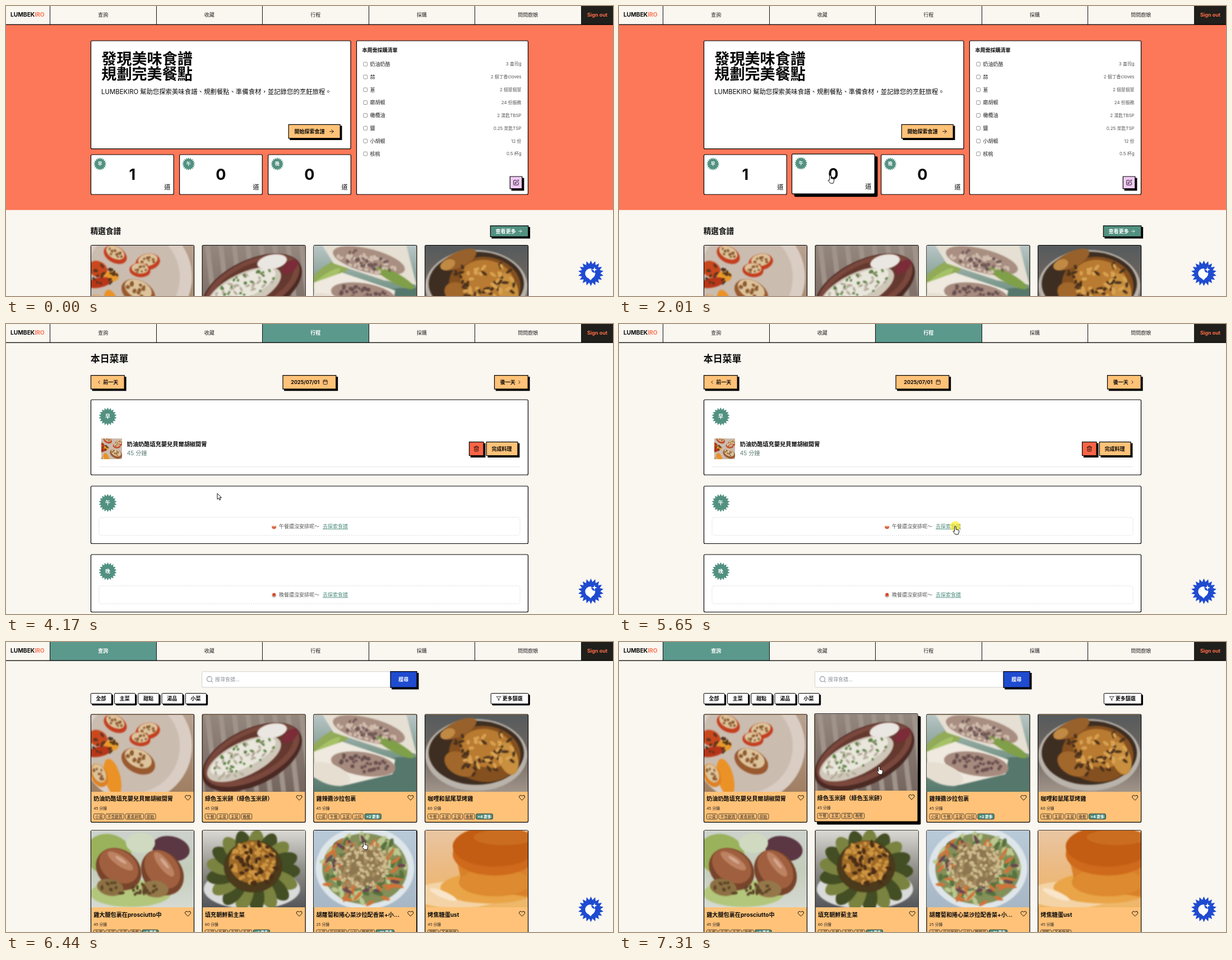
These frames come from a looping animation (1083x517 px, 8000 ms). An HTML page with a canvas:

```html
<!DOCTYPE html>
<html lang="zh-Hant">
<head>
<meta charset="utf-8">
<title>食譜</title>
<style>
html, body { margin: 0; width: 100%; height: 100%; overflow: hidden; background: #faf6f0; }
canvas { display: block; width: 100vw; height: 100vh; }
</style>
</head>
<body>
<canvas id="stage" width="1083" height="517"></canvas>
<script>
const ctx = document.getElementById('stage').getContext('2d');
const W = 1083, H = 517, LOOP = 8000, BODY = 9.03, TAU = Math.PI * 2;
const FONT = 'Inter, "Noto Sans CJK TC", "Noto Sans CJK", sans-serif';
const PAPER = '#faf6f0', CORAL = '#fc7858', AMBER = '#ffc278', TEAL = '#529181', BLUE = '#1f4bd0', INK = '#0a0a0a';

const ICON = {
  arrow: 'M5 12h14M12 5l7 7-7 7',
  left: 'M15 18l-6-6 6-6',
  right: 'M9 18l6-6-6-6',
  calendar: 'M8 2v4M16 2v4M3 10h18M5 4h14a2 2 0 0 1 2 2v14a2 2 0 0 1-2 2H5a2 2 0 0 1-2-2V6a2 2 0 0 1 2-2z',
  trash: 'M3 6h18M19 6v14a2 2 0 0 1-2 2H7a2 2 0 0 1-2-2V6M8 6V4a2 2 0 0 1 2-2h4a2 2 0 0 1 2 2v2M10 11v6M14 11v6',
  heart: 'M20.8 4.6a5.5 5.5 0 0 0-7.8 0L12 5.7l-1-1.1a5.5 5.5 0 0 0-7.8 7.8L12 21.2l8.8-8.8a5.5 5.5 0 0 0 0-7.8z',
  search: 'M19 11a8 8 0 1 1-16 0 8 8 0 0 1 16 0zM21 21l-4.3-4.3',
  funnel: 'M22 3H2l8 9.5V19l4 2v-8.5z',
  edit: 'M12 3H5a2 2 0 0 0-2 2v14a2 2 0 0 0 2 2h14a2 2 0 0 0 2-2v-7M18.4 2.6a2.1 2.1 0 0 1 3 3L12 15l-4 1 1-4z'
};
const ARROW = new Path2D('M0 0V10.5L2.5 8.2 4.1 11.9 5.9 11.1 4.3 7.5H7.4z');
const HAND = new Path2D('M-1.3 1a1.3 1.3 0 0 1 2.6 0V5.3l3.8.8q1.7.4 1.6 2l-.4 3-1.2 3H.2L-3.6 9.5q-.6-1.5 1-1.4L-1.3 9z');

// ---- drawing helpers ----
function txt(s, x, cy, size = BODY, weight = 400, color = INK, align = 'left') {
  ctx.font = `${weight} ${size}px ${FONT}`;
  ctx.fillStyle = color;
  ctx.textAlign = align;
  ctx.fillText(s, x, cy + size * 0.365);
  return ctx.measureText(s).width;
}
const bold = (s, x, cy, size, color, align) => txt(s, x, cy, size, 700, color, align);

function rect(x, y, w, h, color) {
  ctx.fillStyle = color;
  ctx.fillRect(x, y, w, h);
}

function box(x, y, w, h, fill, shadow = 0, r = 0, line = '#000', lw = 1.2) {
  const shape = d => { ctx.beginPath(); ctx.roundRect(x + d, y + d, w, h, r); };
  if (shadow) {
    shape(shadow);
    ctx.fillStyle = ctx.strokeStyle = '#000';
    ctx.lineWidth = lw;
    ctx.fill();
    ctx.stroke();
  }
  shape(0);
  ctx.fillStyle = fill;
  ctx.fill();
  ctx.strokeStyle = line;
  ctx.lineWidth = lw;
  ctx.stroke();
}

function icon(name, cx, cy, size, color = INK, width = 2) {
  ctx.save();
  ctx.translate(cx - size / 2, cy - size / 2);
  ctx.scale(size / 24, size / 24);
  ctx.lineWidth = width;
  ctx.lineCap = ctx.lineJoin = 'round';
  ctx.strokeStyle = color;
  ctx.stroke(new Path2D(ICON[name]));
  ctx.restore();
}

function star(cx, cy, outer, inner, points, color) {
  ctx.beginPath();
  for (let i = 0; i < points * 2; i++) {
    const a = i * Math.PI / points - Math.PI / 2, r = i % 2 ? inner : outer;
    ctx.lineTo(cx + r * Math.cos(a), cy + r * Math.sin(a));
  }
  ctx.fillStyle = color;
  ctx.fill();
}

function disc(x, y, r, color, from = 0, to = TAU) {
  ctx.beginPath();
  ctx.arc(x, y, r, from, to);
  ctx.fillStyle = color;
  ctx.fill();
}

function mealBadge(label, cx, cy, r, size) {
  star(cx, cy, r, r * 0.76, 18, TEAL);
  bold(label, cx, cy, size, '#fff', 'center');
}

// Veil over the page area, used for fades between pages
function veil(amount, top = 34) {
  if (amount <= 0) return;
  ctx.globalAlpha = Math.min(1, amount);
  rect(0, top, W, H - top, PAPER);
  ctx.globalAlpha = 1;
}

// ---- photos, as soft simple shapes ----
let seed = 11;
const rnd = () => (seed = seed * 16807 % 2147483647) / 2147483647;

function makePhoto(paint) {
  const c = document.createElement('canvas');
  c.width = 183;
  c.height = 137;
  const g = c.getContext('2d');
  const p = {
    bg(...colors) {
      const grad = g.createLinearGradient(0, 0, 0, 137);
      colors.forEach((col, i) => grad.addColorStop(i / (colors.length - 1), col));
      g.fillStyle = grad;
      g.fillRect(0, 0, 183, 137);
      g.filter = 'blur(1px)';
    },
    oval(color, x, y, rx, ry = rx, a = 0) {
      g.fillStyle = color;
      g.beginPath();
      g.ellipse(x, y, rx, ry, a, 0, TAU);
      g.fill();
    },
    poly(color, ...pts) {
      g.fillStyle = color;
      g.beginPath();
      for (let i = 0; i < pts.length; i += 2) g.lineTo(pts[i], pts[i + 1]);
      g.fill();
    },
    bits(color, n, x, y, rx, ry, tilt, len, thick = len) {
      for (let i = 0; i < n; i++) {
        const a = rnd() * TAU, d = Math.sqrt(rnd());
        const u = rx * d * Math.cos(a), v = ry * d * Math.sin(a);
        p.oval(color, x + u * Math.cos(tilt) - v * Math.sin(tilt), y + u * Math.sin(tilt) + v * Math.cos(tilt),
          len * (0.6 + rnd() * 0.6), thick, rnd() * Math.PI);
      }
    }
  };
  paint(p);
  return c;
}

function stuffedPepper(p, x, y, s, a, skin = '#c43f20') {
  p.oval(skin, x, y + s * 0.12, s * 1.1, s * 0.72, a);
  p.oval('#dcc39c', x, y - s * 0.08, s * 0.88, s * 0.55, a);
  p.bits('#8f5c30', 10, x, y, s * 0.7, s * 0.4, a, s * 0.12);
}

const photos = [
  p => {
    p.bg('#b8a291', '#a07f62');
    p.oval('#d9cdc4', 80, 56, 100);
    p.oval('#cbbcb0', 74, 56, 84);
    p.oval('#c9481e', 12, 42, 18, 14, 0.5);
    p.oval('#e79a2b', 36, 55, 13, 10);
    p.oval('#b93518', 14, 66, 22, 9, -0.2);
    p.bits('#51351f', 18, 24, 52, 24, 18, 0, 4, 2);
    stuffedPepper(p, 43, 14, 20, 0.5);
    stuffedPepper(p, 101, 27, 20, -0.2);
    stuffedPepper(p, 87, 42, 17, 0.1);
    stuffedPepper(p, 84, 80, 29, 0.45, '#9a5a30');
    p.oval('#eb9227', 38, 112, 14, 34, -0.25);
    stuffedPepper(p, 14, 106, 20, 1.1, '#dd8226');
  },
  p => {
    p.bg('#94877e', '#75665f');
    for (let x = -20; x < 190; x += 24) p.poly('#a0938a', x, 0, x + 9, 0, x + 25, 137, x + 16, 137);
    p.oval('#4b2a24', 88, 76, 96, 50, -0.45);
    p.oval('#7a483d', 88, 72, 92, 45, -0.45);
    p.oval('#65392f', 88, 71, 80, 36, -0.45);
    p.oval('#cfc8ba', 74, 79, 72, 30, -0.45);
    p.oval('#e9e6dc', 72, 74, 64, 21, -0.45);
    p.oval('#eae6e1', 124, 29, 27, 13, -0.2);
    p.oval('#7c2b38', 156, 38, 17, 9, -0.7);
    p.bits('#b5ab98', 30, 73, 79, 62, 24, -0.45, 5, 2);
    p.bits('#5c8144', 34, 75, 74, 60, 22, -0.45, 3, 2);
  },
  p => {
    p.bg('#b9c6c6', '#7e9a8e', '#587a6d');
    p.oval('#56786c', 140, 120, 90, 42, -0.2);
    p.oval('#91ab58', 28, 50, 44, 16, -0.6);
    p.poly('#e6dfd3', 15, 0, 165, 0, 183, 70, 125, 62, 35, 32);
    p.oval('#a98f82', 98, 27, 66, 21, 0.25);
    p.oval('#7f9f48', 145, 58, 38, 9, 0.5);
    p.oval('#a6c267', 22, 58, 30, 7, -0.6);
    p.poly('#efe9df', 0, 66, 50, 48, 145, 80, 140, 106, 60, 125, 0, 112);
    p.oval('#a68b7e', 88, 88, 58, 21, 0.15);
    p.oval('#e5ded1', 28, 106, 38, 18, 0.35);
    p.bits('#6a5151', 40, 92, 87, 50, 15, 0.15, 3);
    p.bits('#d2bfb0', 45, 94, 30, 56, 15, 0.25, 4, 2.5);
    p.bits('#715a58', 25, 98, 27, 54, 15, 0.25, 3);
  },
  p => {
    p.bg('#565b5d', '#70675f', '#a0948a');
    p.oval('#b9b3ab', 91, 72, 91, 64);
    p.oval('#3e2e22', 91, 68, 85, 57);
    p.oval('#85501f', 106, 70, 64, 50, 0.1);
    p.oval('#b97b31', 110, 60, 48, 34, 0.2);
    p.oval('#98602a', 60, 25, 34, 14, -0.45);
    p.oval('#c08a45', 40, 34, 14, 9, -0.4);
    p.oval('#a2672a', 62, 88, 30, 20, 0.5);
    p.oval('#c8903f', 148, 78, 17, 30, -0.3);
    p.bits('#4a321d', 36, 104, 66, 58, 42, 0, 6, 2.5);
    p.bits('#d8a252', 26, 108, 64, 50, 34, 0, 6, 3);
  },
  p => {
    p.bg('#cdd3cd', '#c4cdbb', '#d6dad3');
    p.oval('#9bb25c', 30, 42, 42, 36, 0.2);
    p.oval('#b3c77c', 70, 112, 72, 24);
    p.oval('#5b3743', 142, 32, 34, 22, 0.2);
    p.oval('#cfdac0', 88, 22, 26, 18);
    for (const [x, y, a] of [[49, 66, 0.6], [127, 72, 0.9]]) {
      p.oval('#78442c', x, y + 3, 43, 35, a);
      p.oval('#a0603f', x, y - 3, 38, 28, a);
      p.oval('#bd8262', x + 3, y - 12, 27, 9, a);
      p.oval('#d3a890', x + 4, y - 14, 12, 3, a);
    }
    p.oval('#8d7144', 34, 101, 24, 15, 0.2);
    p.oval('#94784a', 114, 104, 24, 15, 0.1);
    p.bits('#5d4628', 26, 74, 102, 58, 12, 0, 4, 2.5);
  },
  p => {
    p.bg('#dbd9d3', '#918f89', '#54565a');
    p.oval('#d9dada', 88, 104, 86, 36);
    for (let i = 0; i < 17; i++) {
      const a = i / 17 * TAU;
      p.oval(i % 2 ? '#7b8340' : '#434e24', 90 + 54 * Math.cos(a), 72 + 44 * Math.sin(a), 30, 15, a);
    }
    p.oval('#4b3a1c', 90, 64, 52, 46);
    p.oval('#9f6b28', 89, 56, 42, 38);
    p.bits('#cf9642', 55, 89, 56, 42, 38, 0, 5, 3.2);
    p.bits('#4b2d16', 32, 90, 60, 44, 40, 0, 5, 3);
  },
  p => {
    p.bg('#b9cad9', '#a8b7c6');
    p.oval('#dfe6ea', 91, 67, 88, 74);
    p.oval('#84905a', 91, 68, 76, 63);
    p.bits('#bcc88f', 55, 91, 68, 74, 61, 0, 9, 4);
    p.bits('#58733f', 45, 91, 68, 74, 61, 0, 8, 4);
    p.bits('#d2743a', 40, 91, 68, 76, 62, 0, 13, 3);
    p.bits('#6a4650', 26, 91, 68, 68, 56, 0, 8, 3);
    p.oval('#8d7750', 88, 64, 40, 36);
    p.bits('#a58c60', 80, 90, 64, 52, 46, 0, 4.5, 3);
    p.bits('#cfbc90', 80, 88, 62, 48, 42, 0, 4.5, 2.6);
  },
  p => {
    p.bg('#e9c6a2', '#ecba82', '#efb768');
    p.oval('#f4d4a6', 58, 114, 80, 24);
    p.oval('#e9a548', 115, 102, 88, 28);
    p.poly('#d9802a', 50, 22, 183, 22, 183, 118, 66, 98);
    p.oval('#dd8a30', 124, 92, 64, 25);
    p.oval('#cf6a1c', 124, 42, 75, 38);
    p.oval('#c25d13', 124, 28, 75, 36);
    p.oval('#cb6d20', 140, 12, 54, 14);
    p.oval('#f9e5c9', 32, 114, 26, 6, 0.4);
  }
].map(makePhoto);

const recipes = [
  ['奶油奶酪填充嬰兒貝爾胡椒開胃', 45, '小菜 不含麩質 素食卵乳 原始'],
  ['綠色玉米餅（綠色玉米餅）', 45, '午餐 主菜 主菜 晚餐'],
  ['雞辣醬沙拉包裹', 45, '小菜 午餐 主菜 沙拉', 2],
  ['咖哩和鼠尾草烤雞', 60, '午餐 主菜 主菜 晚餐', 4],
  ['雞大腿包裹在prosciutto中', 45, '午餐 主菜 主菜 晚餐', 5],
  ['填充朝鮮薊主菜', 60, '小菜 午餐 主菜 主菜', 2],
  ['胡蘿蔔和捲心菜沙拉配香菜+小...', 25, '小菜 反前新鮮 沙拉 開胃菜', 12],
  ['烤焦糖蛋ust', 45, '甜點 不含麩質']
];

// ---- pointer ----
const PATH = [
  [780, 974, 507], [890, 974, 507], [1310, 377, 302], [4430, 377, 302], [4700, 513, 264], [4830, 513, 264],
  [5060, 735, 318], [5200, 660, 355], [5320, 600, 361], [5720, 600, 361], [5920, 639, 356], [6440, 639, 356],
  [7050, 464, 222]
];
const CLICKS = [[3630, 3770], [5650, 5720], [7180, 7310]];

function pointerAt(t) {
  const i = PATH.findIndex(k => k[0] > t);
  if (i === 0) return [-99, -99];
  if (i < 0) return PATH[PATH.length - 1].slice(1);
  const [t0, x0, y0] = PATH[i - 1], [t1, x1, y1] = PATH[i];
  const u = (t - t0) / (t1 - t0), e = u * u * (3 - 2 * u);
  return [x0 + (x1 - x0) * e, y0 + (y1 - y0) * e];
}

let now = 0, overLink = false;

function over(t, x, y, w, h) {
  const [px, py] = pointerAt(t);
  return px >= x && px <= x + w && py >= y && py <= y + h;
}

// Hover progress: share of the last 150 ms spent inside the box
function hover(since, ...area) {
  let n = 0;
  for (let k = 0; k < 10; k++) {
    const t = now - k * 15;
    if (t >= since && over(t, ...area)) n++;
  }
  return n / 10;
}

function liftCard(x, y, w, h, fill, since, content) {
  const p = hover(since, x, y, w, h);
  if (over(now, x, y, w, h)) overLink = true;
  ctx.save();
  ctx.translate(-1.1 * p, -1.1 * p);
  box(x, y, w, h, fill, 4.7 * p, 2);
  content();
  ctx.restore();
}

function drawPointer() {
  const [x, y] = pointerAt(now);
  if (CLICKS.some(([a, b]) => now >= a && now < b)) disc(x, y - 0.5, 9, 'rgba(255,238,20,.65)');
  ctx.save();
  ctx.translate(x, y);
  const shape = overLink ? HAND : ARROW;
  ctx.fillStyle = '#fff';
  ctx.strokeStyle = '#111';
  ctx.lineWidth = 1;
  ctx.fill(shape);
  ctx.stroke(shape);
  ctx.restore();
}

// ---- shared parts ----
function recipeCard(i, y, since) {
  const x = 151.5 + (i % 4) * 198.7, [title, mins, tags, more] = recipes[i];
  liftCard(x, y, 184, 192.3, AMBER, since, () => {
    ctx.drawImage(photos[i], x + 0.5, y + 0.5, 183, 137);
    bold(title, x + 4.7, y + 150.5, 10.15);
    icon('heart', x + 173, y + 148.7, 11.5);
    txt(mins + ' 分鐘', x + 4.7, y + 167.6, 6.77, 400, '#222');
    let tx = x + 5;
    const tag = (s, fill, color, weight) => {
      ctx.font = `${weight} 6.77px ${FONT}`;
      const w = ctx.measureText(s).width + 5.4;
      box(tx, y + 177.3, w, 9.6, fill, 0, 2, '#111', 0.7);
      txt(s, tx + 2.7, y + 182.1, 6.77, weight, color);
      tx += w + 2.6;
    };
    tags.split(' ').forEach(s => tag(s, AMBER, '#222', 400));
    if (more) tag(`+${more} 更多`, TEAL, '#fff', 700);
  });
}

function nav() {
  const active = now >= 5720 ? 0 : now >= 3770 ? 2 : -1;
  rect(0, 0, W, 33, PAPER);
  const w = bold('LUMBEK', 8, 15.5, 10.25);
  bold('IRO', 8 + w, 15.5, 10.25, CORAL);
  ['查詢', '收藏', '行程', '採購', '問問廚娘'].forEach((s, i) => {
    const x = 78.5 + i * 189.5, on = i === active;
    if (on) rect(x, 0, 189.5, 33, '#5b998c');
    txt(s, x + 94.7, 15.5, BODY, on ? 700 : 400, on ? '#fff' : '#222', 'center');
  });
  rect(1026, 0, 57, 33, '#201f1c');
  bold('Sign out', 1055, 15.5, BODY, '#ff6d47', 'center');
  for (let i = 0; i < 5; i++) rect(Math.round(78.1 + i * 189.5), 0, 1, 33, '#111');
  rect(0, 32.5, W, 1.3, '#000');
}

function chatButton() {
  star(1043.5, 476.5, 22.8, 16.8, 18, BLUE);
  disc(1042.3, 477, 9, '#fff');
  ctx.beginPath();
  ctx.moveTo(1036, 482);
  ctx.lineTo(1043, 489);
  ctx.lineTo(1049, 482);
  ctx.fill();
  disc(1050, 470, 5.6, BLUE);
  star(1050, 470, 4.8, 1.6, 4, '#fff');
}

// ---- pages ----
const shopping = [
  ['奶油奶酪', '3 盎司g'], ['蒜', '2 個丁香cloves'], ['蔥', '2 個莖個莖'], ['磨胡椒', '24 份服務'],
  ['橄欖油', '2 湯匙TBSP'], ['鹽', '0.25 茶匙TSP'], ['小胡椒', '12 份'], ['核桃', '0.5 杯g']
];

function home() {
  rect(0, 33, W, 330.7, CORAL);

  box(151.5, 62, 463.5, 192.7, '#fff', 0, 2);
  bold('發現美味食譜', 170.3, 94, 27.1);
  bold('規劃完美餐點', 170.3, 121.3, 27.1);
  txt('LUMBEKIRO', 170, 152.5, 11.4);
  txt('幫助您探索美味食譜、規劃餐點、準備食材，並記錄您的烹飪旅程。', 239, 152.5, 11.4);
  box(504.2, 211.3, 92, 24.5, AMBER, 2.7);
  bold('開始探索食譜', 514.5, 223.5);
  icon('arrow', 581, 223.7, 11);

  [['早', 1], ['午', 0], ['晚', 0]].forEach(([label, n], i) => {
    const x = 151.5 + i * 158.1;
    liftCard(x, 265, 147.7, 71, '#fff', 0, () => {
      mealBadge(label, x + 16.2, 281.6, 11.6, 7.9);
      bold(n, x + 73.8, 300, 27.1, INK, 'center');
      txt('道', x + 130.8, 322.5, 11.28);
    });
  });

  box(625.5, 62, 306, 274, '#fff', 0, 2);
  bold('本周需採購清單', 635.5, 78.3);
  shopping.forEach(([name, qty], i) => {
    const y = 103.6 + i * 22.84;
    box(637.8, y - 3.4, 6.8, 6.8, '#fff', 0, 1.4, '#767676', 0.8);
    txt(name, 649.5, y, BODY, 400, '#222');
    txt(qty, 919.5, y, 7.9, 400, '#555', 'right');
  });
  box(899.3, 304, 21.5, 21.7, '#f2caf6', 3);
  icon('edit', 910, 314.8, 11.3);

  bold('精選食譜', 150.7, 401.3, 13.6);
  box(864.3, 391.8, 67.5, 19.5, TEAL, 2.7);
  bold('查看更多', 873.6, 401.5, BODY, '#fff');
  icon('arrow', 917.3, 401.5, 9, '#fff');
  for (let i = 0; i < 4; i++) recipeCard(i, 426.6, 0);
}

function emptyMeal(y, meal) {
  ctx.setLineDash([2.2, 1.6]);
  box(166, y - 16, 751, 32, '#fff', 0, 3.5, '#d4d4d4', 0.8);
  ctx.setLineDash([]);
  if (meal === '午') {
    rect(474, y - 1.2, 8.5, 1.8, '#f0b89b');
    disc(478.2, y + 0.4, 4.2, '#d9603f', 0, Math.PI);
  } else {
    disc(478.2, y + 0.8, 4.3, '#c9c4c0', 0, Math.PI);
    disc(478.2, y - 0.3, 3, '#d9482b');
  }
  txt(meal + '餐還沒安排呢～', 487, y, BODY, 400, '#555');
  txt('去探索食譜', 565, y, BODY, 400, '#4c8b7c');
  rect(565, y + 4.6, 45.3, 0.8, '#4c8b7c');
  if (over(now, 565, y - 6, 46, 12)) overLink = true;
}

function schedule() {
  bold('本日菜單', 150.7, 62, 16.95);
  box(151.5, 91.7, 59.7, 24.2, AMBER, 2.8);
  icon('left', 166, 103.7, 10);
  bold('前一天', 173.3, 103.7);
  box(494, 91.7, 94.8, 24.2, AMBER, 2.8);
  bold('2025/07/01', 508.3, 103.7);
  icon('calendar', 569.7, 103.5, 9.5);
  box(871.5, 91.7, 59.7, 24.2, AMBER, 2.8);
  bold('後一天', 881.8, 103.7);
  icon('right', 916, 103.7, 10);

  [['早', 135, 134], ['午', 289, 102.5], ['晚', 411, 102.5]].forEach(([meal, y, h]) => {
    box(151.5, y, 780, h, '#fff', 0, 2);
    mealBadge(meal, 181.5, y + 30, 16.2, BODY);
    if (meal !== '早') emptyMeal(y + 71.8, meal);
  });

  ctx.drawImage(photos[0], 12, 8, 100, 100, 170, 204, 36.7, 36.5);
  bold(recipes[0][0], 215.8, 214, 10.2);
  txt('45 分鐘', 215.8, 230.3, 10.15, 400, '#5d7e76');
  box(826.5, 210.3, 25.5, 24.2, '#fb6446', 2.8);
  icon('trash', 839.2, 222.3, 11);
  box(857.2, 210.3, 55.8, 24.2, AMBER, 2.8);
  bold('完成料理', 866.4, 222.4);
  rect(166, 254, 751, 0.8, '#dfe1e4');
}

function search() {
  box(349.6, 52.8, 337, 28, '#fff', 0, 1.5, '#d3d0cc', 1);
  icon('search', 363.5, 66.7, 13.5, '#8c929b', 1.9);
  txt('搜尋食譜...', 373, 66.8, BODY, 400, '#8d9299');
  box(686, 52.7, 47, 28.4, BLUE, 2.8);
  bold('搜尋', 709.3, 66.9, BODY, '#fff', 'center');

  ['全部', '主菜', '甜點', '湯品', '小菜'].forEach((s, i) => {
    const x = 151.3 + i * 42.25;
    box(x, 91.5, 37, 18.7, '#fff', 2.4, 1.5, '#000', 1);
    bold(s, x + 18.3, 100.8, BODY, INK, 'center');
  });
  box(865.2, 91.5, 66.8, 18.7, '#fff', 2.4, 1.5, '#000', 1);
  icon('funnel', 879, 100.8, 9.5);
  bold('更多篩選', 885.7, 100.8);

  if (now < 6370) {
    box(518, 170.4, 20.8, 20.6, '#fbb3a2', 0, 0, '#817872');
    icon('left', 528.4, 180.6, 10, '#817872');
    box(544.4, 170.4, 20.8, 20.6, '#fc7454');
    icon('right', 554.8, 180.6, 10);
  } else {
    for (let i = 0; i < 8; i++) recipeCard(i, i < 4 ? 129 : 335.8, 6430);
    if (now < 6440) veil(0.4, 120);
  }
}

function render() {
  overLink = false;
  rect(0, 0, W, H, PAPER);
  if (now < 3900) {
    home();
    if (now >= 3770) veil((now - 3700) / 200);
  } else if (now < 5850) {
    schedule();
    veil(now < 4170 ? 0.5 : now < 5720 ? 0 : (now - 5650) / 200);
  } else {
    search();
    veil((5990 - now) / 190);
  }
  nav();
  chatButton();
  drawPointer();
}

const start = performance.now();
function tick() {
  now = (performance.now() - start) % LOOP;
  render();
  requestAnimationFrame(tick);
}
tick();
</script>
</body>
</html>
```
